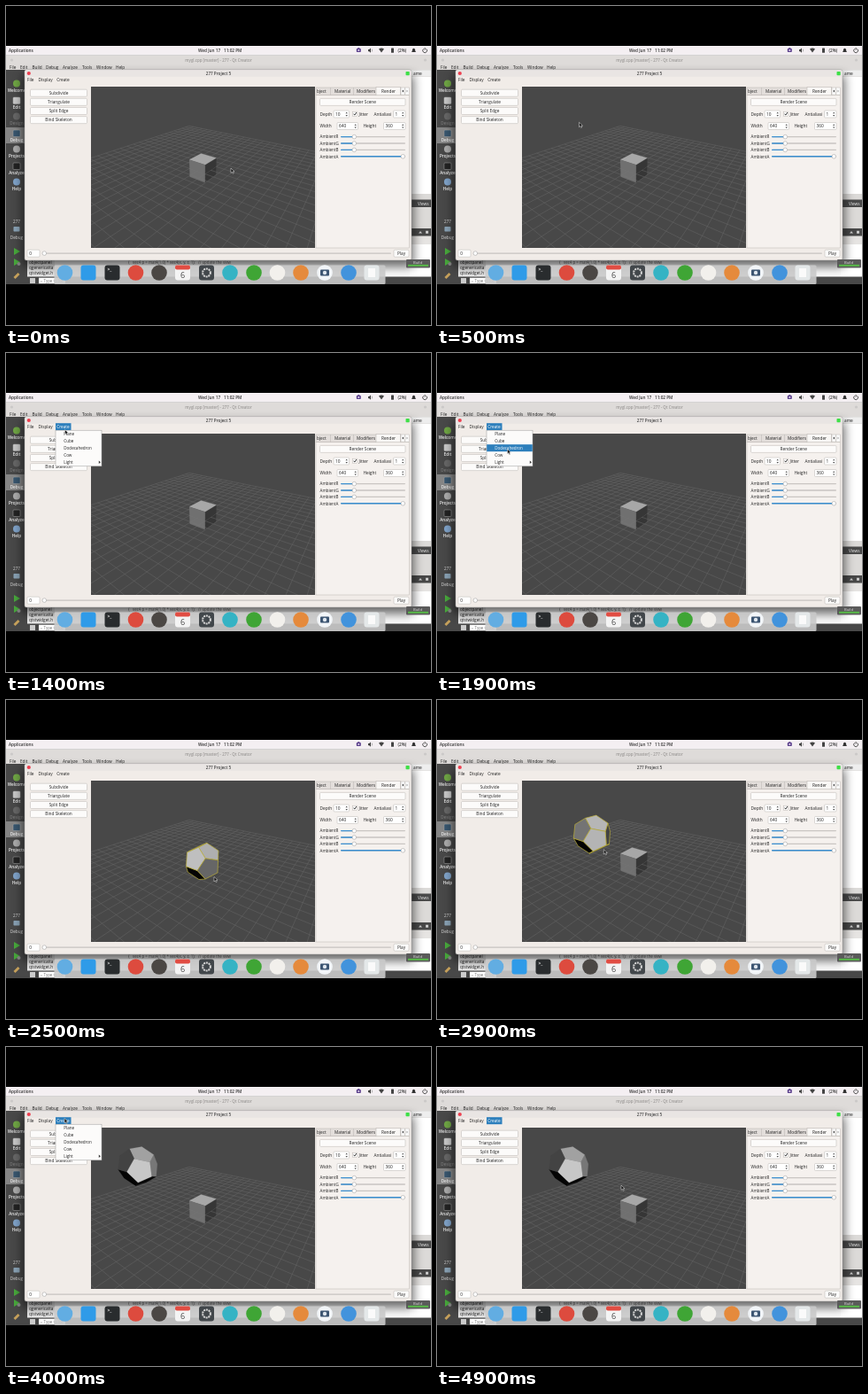
Recreate the animation shown at these times as an HTML page. Size 480 by 360 pixels, loop 5 s.

```html
<!DOCTYPE html>
<html lang="en">
<head>
<meta charset="utf-8">
<title>277 Project 5</title>
<style>
html, body { margin: 0; width: 100%; height: 100%; overflow: hidden; background: #000; }
svg { display: block; width: 480px; height: 360px; }
text { font-family: "Open Sans", "Noto Sans", sans-serif; font-size: 4.75px; fill: #222; white-space: pre; }
</style>
</head>
<body>
<svg id="stage" viewBox="0 0 480 360"></svg>
<script>
const stage = document.getElementById('stage');
const rect = (x, y, w, h, fill, more = '') =>
  `<rect x="${x}" y="${y}" width="${w}" height="${h}" fill="${fill}" ${more}/>`;
const circle = (x, y, r, fill, more = '') =>
  `<circle cx="${x}" cy="${y}" r="${r}" fill="${fill}" ${more}/>`;
const path = (d, fill, more = '') => `<path d="${d}" fill="${fill}" ${more}/>`;
const text = (x, y, s, more = '') => `<text x="${x}" y="${y}" ${more}>${s}</text>`;
const mid = 'text-anchor="middle"';
const style = (fill, size = 4.75, weight = 400) =>
  `style="fill:${fill};font-size:${size}px;font-weight:${weight}"`;
const edge = 'stroke="#b9b4b0" stroke-width=".5"';
const PANEL = '#f1ece8';

const button = (x, y, w, h, label) =>
  rect(x, y, w, h, '#fcfbfa', `rx="1.2" ${edge}`) + text(x + w / 2, y + h / 2 + 1.7, label, mid);

const spin = (x, y, w, value) => {
  const a = x + w - 4;
  return rect(x, y, w, 8, '#fff', `rx="1" ${edge}`) + text(x + 2, y + 5.8, value) +
    path(`M${a} ${y + 3.2}l1.2 -1.4l1.2 1.4zM${a} ${y + 5}l1.2 1.4l1.2 -1.4z`, '#444');
};

// ---- 3D view -------------------------------------------------------------
const VIEW = [96, 91, 253, 182];
const CX = 222.4, CY = 182.3, FOCAL = 218, DIST = 10.2;
const AZ = 53.5 * Math.PI / 180, TILT = 27 * Math.PI / 180;
const cosA = Math.cos(AZ), sinA = Math.sin(AZ), cosT = Math.cos(TILT), sinT = Math.sin(TILT);
const LAMP = [1.6, 3.9, 2.8];
const dot = (a, b) => a[0] * b[0] + a[1] * b[1] + a[2] * b[2];
const add = (a, b) => a.map((v, i) => v + b[i]);
const sub = (a, b) => a.map((v, i) => v - b[i]);
const scale = k => v => v.map(c => c * k);
const unit = v => scale(1 / Math.hypot(...v))(v);

const rotate = ([x, y, z]) => {
  const near = x * cosA + z * sinA;
  return [x * sinA - z * cosA, y * cosT - near * sinT, near * cosT + y * sinT];
};
const flatten = ([r, u, w]) => {
  const k = FOCAL / (DIST - w);
  return [CX + r * k, CY - u * k];
};
const project = p => flatten(rotate(p));
const fix = p => p.map(v => v.toFixed(2)).join(' ');
const poly = pts => 'M' + pts.map(fix).join('L') + 'Z';

function gridPath(half, step) {
  const nearest = DIST - 0.4;
  const line = (p, q) => {
    let a = rotate(p), b = rotate(q);
    if (a[2] > b[2]) [a, b] = [b, a];
    if (b[2] > nearest) b = add(a, scale((nearest - a[2]) / (b[2] - a[2]))(sub(b, a)));
    return 'M' + fix(flatten(a)) + 'L' + fix(flatten(b));
  };
  let d = '';
  for (let i = -half; i <= half; i += step) {
    d += line([i, 0, -half], [i, 0, half]) + line([-half, 0, i], [half, 0, i]);
  }
  return d;
}

// Flat-shaded convex solid lit by a lamp at a fixed point.
function solid(verts, normals, sides, at, stroke) {
  let out = '';
  for (const normal of normals) {
    const n = unit(normal);
    const face = [...verts].sort((a, b) => dot(b, n) - dot(a, n)).slice(0, sides).map(v => add(v, at));
    const centre = scale(1 / sides)(face.reduce(add));
    const eye = sub([0, 0, DIST], rotate(centre));
    if (dot(rotate(n), eye) <= 0) continue;
    const [mx, my] = project(centre);
    const ring = face.map(project).sort((a, b) =>
      Math.atan2(a[1] - my, a[0] - mx) - Math.atan2(b[1] - my, b[0] - mx));
    const g = Math.round(4 + 225 * Math.max(0, dot(n, unit(sub(LAMP, centre)))));
    const fill = `rgb(${g},${g},${g})`;
    out += path(poly(ring), fill, `stroke="${stroke || fill}" stroke-width="${stroke ? 0.7 : 0.2}" stroke-linejoin="round"`);
  }
  return out;
}

const PHI = (1 + Math.sqrt(5)) / 2;
const SIGNS = [-1, 1];
const cycles = (a, b) => SIGNS.flatMap(s => SIGNS.flatMap(t =>
  [[a * s, b * t, 0], [0, a * s, b * t], [b * t, 0, a * s]]));
const corners = SIGNS.flatMap(x => SIGNS.flatMap(y => SIGNS.map(z => [x, y, z])));
const cubeVerts = corners.map(scale(0.5));
const cubeNormals = [0, 1, 2].flatMap(i => SIGNS.map(s => [0, 1, 2].map(j => j === i ? s : 0)));
const dodecaVerts = [...corners, ...cycles(PHI, 1 / PHI)].map(scale(1 / Math.sqrt(3)));
const dodecaNormals = cycles(1, PHI);

function scene() {
  const grid = gridPath(6, 0.5);
  const lower = [[-.5, 0, .5], [.5, 0, .5], [.5, 0, -.5], [.5, -.5, -.5], [.5, -.5, .5], [-.5, -.5, .5]].map(project);
  return `<clipPath id="view">${rect(...VIEW, '#000')}</clipPath>
    <clipPath id="base">${path(poly(lower), '#000')}</clipPath>` +
    rect(...VIEW, '#484848') +
    `<g clip-path="url(#view)">` +
    path(grid, 'none', 'stroke="#666" stroke-width=".5"') +
    solid(cubeVerts, cubeNormals, 4, [0, 0, 0]) +
    path(grid, 'none', 'stroke="#777" stroke-width=".4" clip-path="url(#base)"') +
    `<g id="dodeca"></g></g>`;
}

// ---- Desktop behind the window --------------------------------------------
function desktop() {
  let s = rect(0, 45, 480, 269, '#e2dfdd') + rect(0, 45, 480, 10.5, '#f4eff2');
  s += text(3, 52, 'Applications', style('#333', 4.7, 600));
  s += text(217, 52, 'Wed Jun 17', style('#333', 4.7, 600)) + text(246, 52, '11:02 PM', style('#333', 4.7, 600));
  s += rect(395.8, 48, 5, 4, '#5b3f8c', 'rx=".8"') + rect(397.2, 47.2, 2.2, 1.4, '#5b3f8c') + circle(398.3, 50, 1.1, '#d8cfe6');
  s += path('M409 49h1.2l1.8 -1.6v5.4l-1.8 -1.6h-1.2z', '#444') +
    path('M413.2 48.6q1 1.5 0 3', 'none', 'stroke="#888" stroke-width=".6"') +
    path('M421 48.6q3 -2 6 0l-3 4z', '#444') +
    rect(435, 47.4, 3, 5.4, '#444', 'rx=".6"') + text(442.5, 52, '(2%)', style('#333', 4.7, 600)) +
    path('M458 52q1 -1 1 -3q1.5 -2.5 3 0q0 2 1 3z', '#333') +
    path('M471.6 48.4a2.4 2.4 0 1 0 3 0M473.1 47v2.6', 'none', 'stroke="#444" stroke-width=".9"');

  s += rect(0, 55.5, 480, 17, '#dedbd9') + rect(0, 55.5, 480, .5, '#c4c4c4');
  s += circle(6.5, 61, 1.6, '#cbc9c8') + circle(473.5, 61, 1.6, '#cbc9c8');
  s += text(240, 62.8, 'mygl.cpp [master] - 277 - Qt Creator', `${mid} ${style('#9a9896', 4.4, 600)}`);
  [['File', 4], ['Edit', 16], ['Build', 29.5], ['Debug', 45], ['Analyze', 64], ['Tools', 86], ['Window', 102], ['Help', 124]]
    .forEach(([label, x]) => s += text(x, 70.8, label, style('#222', 4.7)));

  s += rect(0, 72, 24, 242, '#484848') + rect(0, 137, 24, 18, '#858585');
  [['Welcome', 97, '#6fa544'], ['Edit', 116, '#c8c8c8'], ['Design', 134, '#666'], ['Debug', 153, '#38566e'],
   ['Projects', 171, '#aaa'], ['Analyze', 190, '#222'], ['Help', 208, '#7fa2c8']]
    .forEach(([label, y, c], i) => {
      s += i % 2 ? rect(8, y - 13, 8, 7.5, c, 'rx="1" stroke="#aaa" stroke-width=".5"') : circle(12, y - 9.5, 4, c);
      s += text(12, y, label, `${mid} ${style(i === 2 ? '#777' : '#eee', 4.7, 600)}`);
    });
  s += rect(8.5, 249, 7, 5.5, '#89a2b5', 'rx=".7"') + text(12, 245, '277', `${mid} ${style('#ddd', 4.7)}`) +
    text(12, 263, 'Debug', `${mid} ${style('#ddd', 4.7)}`);
  [277, 289, 303].forEach((y, i) => {
    s += i < 2 ? path(`M9 ${y - 4}l7 4l-7 4z`, '#48a83c') : path(`M8.5 ${y + 3}l5 -5l2 2l-5 5z`, '#c5a05a');
    if (i === 1) s += circle(14.5, y + 2, 2, '#888');
  });

  s += rect(456, 72, 24, 242, '#dcdad8') + rect(456, 72.5, 24, 7, '#eee') +
    text(460, 77.8, 'ame', style('#222')) + rect(456, 80, 24, 132, '#fff') +
    rect(456, 218.5, 24, 8.5, '#4a4a4a') + text(465, 224.7, 'Views', style('#eee')) +
    rect(456, 251, 24, 8.5, '#484848') + path('M466 256.5l2 -2.4l2 2.4zM474 253.8h3v3h-3z', '#ccc') +
    rect(456, 260, 24, 9, '#e6e4e2') + rect(456, 269, 24, 45, '#fff');

  s += rect(24, 285, 432, 29, '#fafafa') + rect(24, 285, 31, 21, '#e6e6e6');
  ['objectpanel', 'qgenericatta', 'qtstwidget.h'].forEach((label, i) =>
    s += text(26, 291 + i * 5.8, label, style('#222', 4.7)));
  s += text(138, 290.7, '{   vec4 p = mat4(1.0) * vec4(x, y, z, 1);   // update the view', style('#5d5d5d', 4.4));
  s += rect(24, 305.5, 456, 8.5, '#484848') + rect(27, 307, 6, 6, '#ccc') +
    rect(37, 306.7, 30, 6.5, '#fff') + text(39, 311.8, '⌕ Type to loc', style('#777', 4.4));
  return s;
}

const buildBadge = () => rect(452, 286, 27, 9.5, '#5a5a5a', 'rx="1"') +
  text(465, 290.5, 'Build', `${mid} ${style('#ddd', 4.2)}`) + rect(454, 291.8, 23, 2, '#57b947');

// ---- Project window ---------------------------------------------------------
function appWindow() {
  let s = rect(19, 78, 441, 216, '#000', 'rx="3" opacity=".6" filter="url(#soft)"') +
    rect(21, 72, 437, 215, PANEL, 'rx="2" stroke="#8d8d8d" stroke-width=".5"') +
    rect(21.3, 72.3, 436.4, 7.5, '#e9e5e3', 'rx="2"');
  s += circle(25.8, 76, 2.1, '#ee3f50') + rect(451.5, 74, 4.2, 4.2, '#3fe047', 'rx=".8"');
  s += text(240, 78, '277 Project 5', `${mid} ${style('#444', 4.6, 600)}`);
  s += text(24, 85.2, 'File') + text(36.5, 85.2, 'Display') +
    `<g id="createBg">${rect(56, 79.2, 17.5, 8, '#2d7fbc')}</g>` + text(57.2, 85.2, 'Create', 'id="create"');

  ['Subdivide', 'Triangulate', 'Split Edge', 'Bind Skeleton'].forEach((label, i) =>
    s += button(27.5, 94.2 + i * 10.15, 64, 8, label));
  s += scene();

  s += rect(350, 100.5, 105.5, 172.5, '#f5f1ee', edge) + rect(350, 92, 96, 8.5, '#e3dedb', edge) +
    rect(418, 91.5, 27.5, 9.3, '#f9f7f5', edge) +
    path('M366.5 92v8.5M392.5 92v8.5', 'none', edge);
  [['bject', 351], ['Material', 371], ['Modifiers', 396], ['Render', 424]]
    .forEach(([label, x]) => s += text(x, 98, label));
  s += rect(446, 92, 4.6, 8.2, '#fafafa', edge) + rect(450.8, 92, 4.6, 8.2, '#fafafa', edge) +
    path('M449 94.6v3l-1.7 -1.5z', '#333') + path('M452.4 94.6v3l1.7 -1.5z', '#aaa');

  s += button(354.5, 104.4, 96.5, 8, 'Render Scene');
  s += text(354.5, 123.8, 'Depth') + spin(370, 118, 17.5, '10') +
    rect(391.5, 119.2, 5, 5, '#fff', edge) +
    path('M392.6 121.7l1.2 1.4l2 -3', 'none', 'stroke="#222" stroke-width=".9"') +
    text(398.5, 123.8, 'Jitter') + text(415.5, 123.8, 'Antialiasi') + spin(437.5, 118, 13.5, '1');
  s += text(354.5, 137.2, 'Width') + spin(374, 131.5, 23.5, '640') +
    text(403.5, 137.2, 'Height') + spin(426.5, 131.5, 24.5, '360');
  ['R', 'G', 'B', 'A'].forEach((c, i) => {
    const y = 147.6 + i * 7.4, x = i < 3 ? 393.3 : 448.3;
    s += text(354.5, y + 1.7, 'Ambient' + c, style('#222', 4.55)) + rect(378, y - .7, 73, 1.4, '#c9c5c2', 'rx=".7"') +
      rect(378, y - .7, x - 378, 1.4, '#3a8fd0', 'rx=".7"') +
      circle(x, y, 2.3, '#fff', 'stroke="#999" stroke-width=".5"');
  });

  s += rect(24, 275.2, 14, 8, '#fff', `rx="1" ${edge}`) + text(26.3, 281, '0') +
    rect(41, 278.5, 394, 1.2, '#c8c4c1', 'rx=".6"') +
    circle(43.3, 279.1, 2.3, '#fff', 'stroke="#999" stroke-width=".5"') + button(438, 275.2, 17, 8, 'Play');
  return s;
}

function dock() {
  const y = 301;
  let s = rect(54.5, 292.5, 374, 21.5, '#c9c9c9', 'opacity=".9" rx="1.5"');
  const square = (x, c) => rect(x - 8.5, y - 8.5, 17, 17, c, 'rx="3"');
  const disc = (x, c) => circle(x, y, 8.8, c);
  s += disc(66.5, '#62ade2') + square(93, '#2f9be8') + square(120, '#292c2e') + disc(146.5, '#dd4b3e') +
    disc(173, '#4b4744') + square(199.5, '#f4f4f4') + square(226.5, '#42474b') + disc(253, '#35b3c4') +
    disc(280, '#3fa535') + disc(306.5, '#f2f0ec') + disc(333, '#e58a3c') + disc(360, '#f2f5f8') +
    disc(387, '#4293dc') + square(413, '#e4e8e9');
  s += text(114.5, 299.2, '&gt;_', style('#eee', 5, 700));
  s += rect(191, 292.5, 17, 5, '#e14d43', 'rx="2"') + text(199.5, 306.5, '6', `${mid} ${style('#444', 9)}`);
  s += circle(226.5, y, 4.4, 'none', 'stroke="#d4d4d4" stroke-width="2" stroke-dasharray="2 .8"') +
    rect(355, 297.5, 10, 7, '#3c5572', 'rx="1"') + circle(360, y, 2.2, '#dfe6ee') +
    path('M409 296h8v10h-8z', '#fafafa');
  return s;
}

const MENU = ['Plane', 'Cube', 'Dodecahedron', 'Cow', 'Light'];
function menu(hover) {
  let s = rect(56, 87.2, 52, 40.6, '#fcfbfa', 'stroke="#999" stroke-width=".5"');
  MENU.forEach((label, i) => {
    const y = 87.2 + i * 8;
    if (i === hover) s += rect(56.2, y, 51.6, 8, '#2d7fbc');
    s += text(65.3, y + 5.6, label, style(i === hover ? '#fff' : '#222', 4.55));
  });
  return s + path('M104.8 121.5v3.6l2 -1.8z', '#333');
}

stage.innerHTML = `<defs><filter id="soft" x="-10%" y="-10%" width="120%" height="125%"><feGaussianBlur stdDeviation="6"/></filter></defs>` +
  rect(0, 0, 480, 360, '#000') +
  `<clipPath id="screen">${rect(0, 45, 480, 269, '#000')}</clipPath><g clip-path="url(#screen)">` +
  desktop() + appWindow() + buildBadge() + dock() + '<g id="menu"></g>' +
  path('M0 0v5.4l1.3 -1.2l.9 2l1 -.5l-.9 -1.9h1.7z', '#111', 'id="pointer" stroke="#eee" stroke-width=".5"') + '</g>';

// ---- Motion -----------------------------------------------------------------
const LOOP = 5000, STEP = 100;
const POINTER = [
  [0, 254, 183], [150, 254, 183], [850, 67, 79.5], [1100, 65, 83], [1300, 65, 84], [1800, 79.5, 108.5],
  [2000, 79.5, 108.5], [2450, 235, 199.5], [2600, 235, 199.5], [3100, 163, 152], [3200, 163, 152],
  [3400, 210.5, 151.5], [3500, 210.5, 151.5], [3900, 66, 80.5], [4200, 66, 80.5], [4800, 208, 156], [5000, 208, 156]
];
const DROP = [-3.07, 2.05, 1.39];
const ease = k => k * k * (3 - 2 * k);
const between = (t, a, b) => t >= a && t < b;
const id = name => document.getElementById(name);
const parts = { dodeca: id('dodeca'), menu: id('menu'), pointer: id('pointer'), create: id('create'), bg: id('createBg') };

function pointerAt(t) {
  const i = POINTER.findIndex(p => p[0] > t);
  const [t0, x0, y0] = POINTER[i - 1], [t1, x1, y1] = POINTER[i];
  const k = ease((t - t0) / (t1 - t0));
  return [x0 + (x1 - x0) * k, y0 + (y1 - y0) * k];
}

function draw(t) {
  const [x, y] = pointerAt(t);
  parts.pointer.setAttribute('transform', `translate(${x.toFixed(2)} ${y.toFixed(2)})`);

  const open = between(t, 1100, 2000) || between(t, 3900, 4700);
  const active = open || t >= 3900;
  const hover = between(x, 56, 108) ? Math.floor((y - 87.2) / 8) : -1;
  parts.menu.innerHTML = open ? menu(hover) : '';
  parts.bg.style.display = active ? '' : 'none';
  parts.create.style.fill = active ? '#fff' : '#222';

  const k = ease(Math.min(1, Math.max(0, (t - 2600) / 500)));
  parts.dodeca.innerHTML = t < 2000 ? '' :
    solid(dodecaVerts, dodecaNormals, 5, scale(k)(DROP), t < 3300 ? '#b9ad38' : '');
}

let last = -1;
const start = performance.now();
function tick() {
  const t = Math.floor(((performance.now() - start) % LOOP) / STEP) * STEP;
  if (t !== last) draw(last = t);
  requestAnimationFrame(tick);
}
tick();
</script>
</body>
</html>
```
